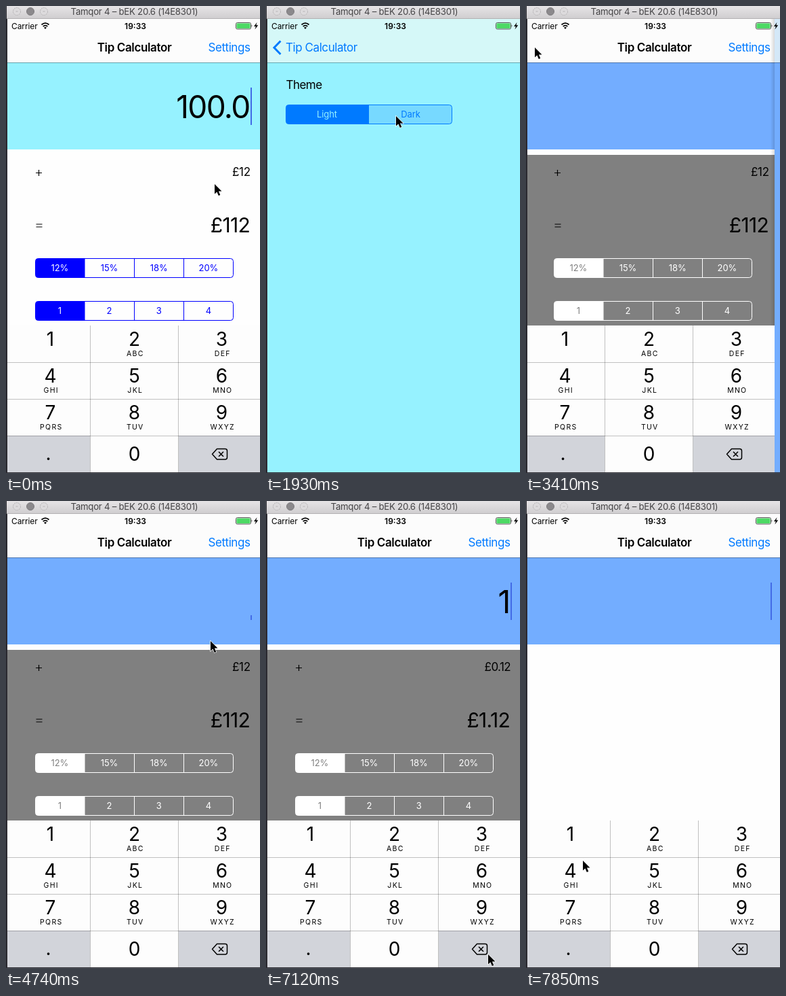
Write an HTML page that moves like this. It is 375 by 687 pixels and loops after 8 s.

```html
<!DOCTYPE html>
<html lang="en">
<head>
<meta charset="utf-8">
<title>Tip Calculator</title>
<style>
html, body { margin: 0; width: 100%; height: 100%; overflow: hidden; background: #2c2b31; }
svg { display: block; width: 375px; height: 687px; font-family: Inter, Roboto, "Liberation Sans", sans-serif; }
text { white-space: pre; }
.mid { text-anchor: middle; }
.end { text-anchor: end; }
.nav { font-size: 17px; letter-spacing: -.43px; fill: #007aff; }
.title { font-weight: 600; letter-spacing: -.37px; fill: #000; }
.amount { font-size: 46px; letter-spacing: -1.7px; }
.small { font-size: 17px; letter-spacing: -.2px; }
.total { font-size: 30px; letter-spacing: -.7px; }
.seg { font-size: 13px; letter-spacing: -.1px; }
.digit { font-size: 28px; }
.letters { font-size: 10.5px; letter-spacing: 1.3px; }

/* 54 steps per loop; one step is 1.852% */
#stage, .a { animation: 8s step-end -12ms infinite; }
#stage { animation-name: theme; }
#main { animation-name: main; }
#page { animation-name: page; }
#keys { animation-name: keys; }
#navMain { animation-name: navMain; }
#navPage { animation-name: navPage; }
#settings { animation-name: settings; }
#back { animation-name: back; }
#press { animation-name: press; }
#hundred { animation-name: hundred; }
#caret { animation-name: caret; }
#panel { animation-name: panel; }
.before { animation-name: before; }
.typed { animation-name: typed; }
#pointer { animation-name: pointer; }

@keyframes theme {
  0% { --paper: #96f2ff; --panel: #fefefe; --ink: #00f; --bar: #d5f8f8;
       --fill1: #007aff; --fill2: transparent; --text1: #96f2ff; --text2: #007aff; }
  25.926%, 100% { --paper: #73adff; --panel: #808080; --ink: #fff; --bar: #d4e8f8;
       --fill1: transparent; --fill2: #007aff; --text1: #007aff; --text2: #73adff; }
}
@keyframes main {
  0% { transform: none; }
  16.667% { transform: translateX(-82px); }
  18.519% { transform: translateX(-110px); }
  40.741% { transform: translateX(-37px); }
  42.593% { transform: translateX(-2px); }
  44.444%, 100% { transform: none; }
}
@keyframes page {
  0% { transform: translateX(385px); }
  14.815% { transform: translateX(373px); }
  16.667% { transform: translateX(100px); }
  18.519% { transform: translateX(8px); }
  20.37% { transform: none; }
  40.741% { transform: translateX(250px); }
  42.593% { transform: translateX(365px); }
  44.444%, 100% { transform: translateX(385px); }
}
@keyframes keys {
  0% { transform: none; }
  16.667% { transform: translateX(-273px); }
  18.519% { transform: translateX(-365px); }
  20.37% { transform: translateX(-380px); }
  40.741% { transform: translateX(-123px); }
  42.593% { transform: translateX(-8px); }
  44.444%, 100% { transform: none; }
}
@keyframes navMain {
  0% { opacity: 1; transform: none; }
  16.667% { opacity: .3; transform: translateX(-75px); }
  18.519% { opacity: 0; }
  40.741% { opacity: .6; transform: translateX(-35px); }
  42.593%, 100% { opacity: 1; transform: none; }
}
@keyframes navPage {
  0% { opacity: 0; }
  16.667% { opacity: .6; transform: translateX(30px); }
  18.519% { opacity: 1; transform: translateX(2px); }
  20.37% { opacity: 1; transform: none; }
  40.741% { opacity: .3; transform: translateX(70px); }
  42.593%, 100% { opacity: 0; }
}
@keyframes settings { 0% { opacity: 1; } 14.815% { opacity: .2; } 16.667%, 100% { opacity: 1; } }
@keyframes back { 0% { opacity: 1; } 38.889% { opacity: .2; } 40.741%, 100% { opacity: 1; } }
@keyframes press { 0% { opacity: 0; } 24.074% { opacity: .2; } 25.926%, 100% { opacity: 0; } }
@keyframes hundred {
  0% { opacity: 1; transform: none; }
  14.815% { opacity: 1; transform: translateY(-9px); }
  37.037%, 100% { opacity: 0; }
}
@keyframes caret {
  0% { clip-path: inset(0); }
  14.815% { clip-path: inset(100% 0 0 0); }
  55.556% { clip-path: inset(48px 0 0 0); }
  62.963% { clip-path: inset(100% 0 0 0); }
  70.37% { clip-path: inset(48px 0 0 0); }
  77.778% { clip-path: inset(100% 0 0 0); }
  81.481%, 100% { clip-path: inset(0); }
}
@keyframes panel { 0% { opacity: 1; } 92.593%, 100% { opacity: 0; } }
@keyframes before { 0% { opacity: 1; } 81.481%, 100% { opacity: 0; } }
@keyframes typed { 0% { opacity: 0; } 81.481% { opacity: 1; } 92.593%, 100% { opacity: 0; } }
@keyframes pointer {
  0% { transform: translate(308px, 262px); }
  1.852% { transform: translate(308px, 262px); animation-timing-function: steps(6); }
  12.963% { transform: translate(337px, 58px); }
  14.815% { transform: translate(338px, 57px); }
  16.667% { transform: translate(338px, 57px); animation-timing-function: steps(4); }
  24.074% { transform: translate(192px, 162px); }
  25.926% { transform: translate(200px, 163px); animation-timing-function: steps(3); }
  31.481% { transform: translate(24px, 42px); }
  33.333% { transform: translate(25px, 50px); }
  37.037% { transform: translate(18px, 58px); }
  38.889% { transform: translate(13px, 61px); }
  42.593% { transform: translate(13px, 61px); animation-timing-function: steps(4); }
  50% { transform: translate(255px, 60px); animation-timing-function: steps(5); }
  59.259% { transform: translate(302px, 206px); animation-timing-function: steps(3); }
  64.815% { transform: translate(300px, 597px); animation-timing-function: steps(2); }
  68.519% { transform: translate(316px, 667px); }
  72.222% { transform: translate(316px, 667px); animation-timing-function: steps(4); }
  79.63% { transform: translate(88px, 492px); }
  83.333% { transform: translate(88px, 492px); animation-timing-function: steps(3); }
  88.889% { transform: translate(328px, 667px); }
  94.444% { transform: translate(328px, 667px); animation-timing-function: steps(2); }
  98.148%, 100% { transform: translate(84px, 529px); }
}
</style>
</head>
<body>
<svg id="stage" viewBox="0 0 375 687">
  <defs>
    <linearGradient id="chrome" x2="0" y2="1">
      <stop stop-color="#e6e4e6"/><stop offset="1" stop-color="#d0ced0"/>
    </linearGradient>
    <linearGradient id="shade">
      <stop stop-opacity="0"/><stop offset="1" stop-opacity=".14"/>
    </linearGradient>
    <clipPath id="app"><path d="M2 19H375V686H2Z"/></clipPath>
  </defs>

  <path d="M1 0H375V18H1Z" fill="url(#chrome)"/>
  <path d="M1 18H375V19H1Z" fill="#b3b1b3"/>
  <g fill="#dddbdd" stroke="#b4b2b4">
    <circle cx="16" cy="8" r="5.5" stroke-dasharray="2 1"/>
    <circle cx="36" cy="8" r="5.5" fill="#8b898c" stroke="#7d7b7e"/>
    <circle cx="56" cy="8" r="5.5" stroke-dasharray="2 1"/>
    <path d="M14.5 8h3m37 0h3"/>
  </g>
  <text class="mid" x="189.5" y="13" font-size="13.2" letter-spacing="-.25" fill="#454446">Tamqor 4 – bEK 20.6 (14E8301)</text>

  <g clip-path="url(#app)">
    <path d="M2 19H375V686H2Z" fill="#fefefe"/>
    <g id="main" class="a">
      <path d="M2 19H375V686H2Z" fill="#fefefe"/>
      <path d="M2 19H375V83H2Z" fill="#fcfcfc"/>
      <path d="M2 83H375V211H2Z" fill="var(--paper)"/>
      <path d="M2 83H375V84H2Z" fill-opacity=".32"/>
      <text id="hundred" class="a amount end" x="359.5" y="164.5">100.0</text>
      <text class="a typed amount end" x="359.5" y="164.5">1</text>
      <rect id="caret" class="a" x="361" y="120" width="2" height="55" fill="#426be6"/>
      <g id="panel" class="a">
        <path d="M2 219H375V686H2Z" fill="var(--panel)"/>
        <path d="M44 245.5h9m-4.5 -4.5v9M44.500 321h9m-9 4h9" stroke="#000" stroke-width="1.2"/>
        <g class="a before">
          <text class="small end" x="361" y="250">£12</text>
          <text class="total end" x="360" y="333">£112</text>
        </g>
        <g class="a typed">
          <text class="small end" x="361" y="250" style="letter-spacing:-.6px">£0.12</text>
          <text class="total end" x="360" y="333">£1.12</text>
        </g>
        <g id="tabs"></g>
      </g>
    </g>

    <g id="page" class="a">
      <path d="M-4 19H2V686H-4Z" fill="url(#shade)"/>
      <path d="M2 19H375V686H2Z" fill="var(--paper)"/>
      <path d="M2 19H375V83H2Z" fill="var(--bar)"/>
      <path d="M2 83H375V84H2Z" fill-opacity=".3"/>
      <text x="29.500" y="122" font-size="17" letter-spacing="-.55">Theme</text>
      <path d="M152 145.500H33.500a4 4 0 0 0 -4 4V169.500a4 4 0 0 0 4 4H152Z" fill="var(--fill1)"/>
      <path id="press" class="a" d="M152 145.500H270.500a4 4 0 0 1 4 4V169.500a4 4 0 0 1 -4 4H152Z" fill="#007aff"/>
      <path d="M152 145.500H270.500a4 4 0 0 1 4 4V169.500a4 4 0 0 1 -4 4H152Z" fill="var(--fill2)"/>
      <rect x="29.500" y="145.500" width="245" height="28" rx="4" fill="none" stroke="#007aff"/>
      <path d="M151.500 146V173" stroke="#007aff"/>
      <text class="seg mid" x="90" y="164" fill="var(--text1)">Light</text>
      <text class="seg mid" x="213.500" y="164" fill="var(--text2)">Dark</text>
    </g>

    <g id="navMain" class="a nav">
      <text class="title mid" x="189.500" y="67">Tip Calculator</text>
      <text id="settings" class="a end" x="360.500" y="67">Settings</text>
    </g>
    <g id="navPage" class="a nav">
      <g id="back" class="a">
        <path d="M21.500 51.500L12 61.200L21.500 71" fill="none" stroke="#007aff" stroke-width="3"/>
        <text x="29" y="67">Tip Calculator</text>
      </g>
    </g>

    <g font-size="12">
      <text x="8" y="33.500" letter-spacing="-.1">Carrier</text>
      <text class="mid" x="191" y="33.500" font-weight="600">19:33</text>
      <g fill="none" stroke="#000" stroke-width="1.800">
        <path d="M52.500 27.500q5.500 -4.800 11 0M54.700 30q3.300 -2.800 6.600 0"/>
      </g>
      <path d="M58 34l-2 -2.300q2 -1.500 4 0Z"/>
      <rect x="339.500" y="24.500" width="22" height="9.500" rx="2" fill="none" stroke="#555"/>
      <rect x="340.500" y="25.500" width="20" height="7.500" rx="1" fill="#4cd964"/>
      <path d="M362.500 27.500q2 1.700 0 3.500Z" fill="#555"/>
      <path d="M370.500 24l-4.500 6h2.800l-1.300 4.500 4.700 -6.200h-2.900Z"/>
    </g>

    <g id="keys" class="a">
      <path d="M2 470H375V686H2Z" fill="#fdfdfd"/>
      <path d="M2 632H124V686H2ZM255 632H375V686H255Z" fill="#d2d4da"/>
      <path d="M124.500 470V686M254.500 470V686M2 524.500H375M2 578.500H375M2 632.500H375" stroke="#000" stroke-opacity=".24"/>
      <g id="pad"></g>
      <text class="digit mid" x="62.500" y="668">.</text>
      <path d="M311.500 651.500H323.500a3 3 0 0 1 3 3V664a3 3 0 0 1 -3 3H311.500L304.500 659.300ZM314 655.800l7 7m0 -7l-7 7" fill="none" stroke="#000" stroke-width="1.500" stroke-linejoin="round"/>
    </g>
  </g>

  <path id="pointer" class="a" d="M0 0V14.500L3.400 11.400L5.800 17L8.300 15.900L5.900 10.500H10.500Z" stroke="#fff" stroke-width="1.300" paint-order="stroke"/>
</svg>
<script>
const label = (cls, x, y, text, extra = "") =>
  `<text class="${cls} mid" x="${x}" y="${y}" ${extra}>${text}</text>`;

function tabs(y, names) {
  const step = 73.2;
  let out = `<path d="M116 ${y}H47.5a4 4 0 0 0 -4 4v20a4 4 0 0 0 4 4H116Z" fill="var(--ink)"/>
    <rect x="43.500" y="${y}" width="292" height="28" rx="4" fill="none" stroke="var(--ink)"/>
    <path d="M116 ${y}v28M189.500 ${y}v28M262.500 ${y}v28" stroke="var(--ink)"/>`;
  names.forEach((name, i) => {
    out += label("seg", 79.3 + i * step, y + 18.700, name, `fill="var(--${i ? "ink" : "panel"})"`);
  });
  return out;
}

const letters = ["", "ABC", "DEF", "GHI", "JKL", "MNO", "PQRS", "TUV", "WXYZ"];
const columns = [65.5, 189.5, 318.5];

document.getElementById("tabs").innerHTML =
  tabs(371.5, ["12%", "15%", "18%", "20%"]) + tabs(434.5, [1, 2, 3, 4]);

document.getElementById("pad").innerHTML = letters.map((word, i) => {
  const x = columns[i % 3], y = 500 + 54 * Math.floor(i / 3);
  return label("digit", x, y, i + 1) + label("letters", x + 1.3, y + 15, word);
}).join("") + label("digit", 189.5, 669, 0);
</script>
</body>
</html>
```
